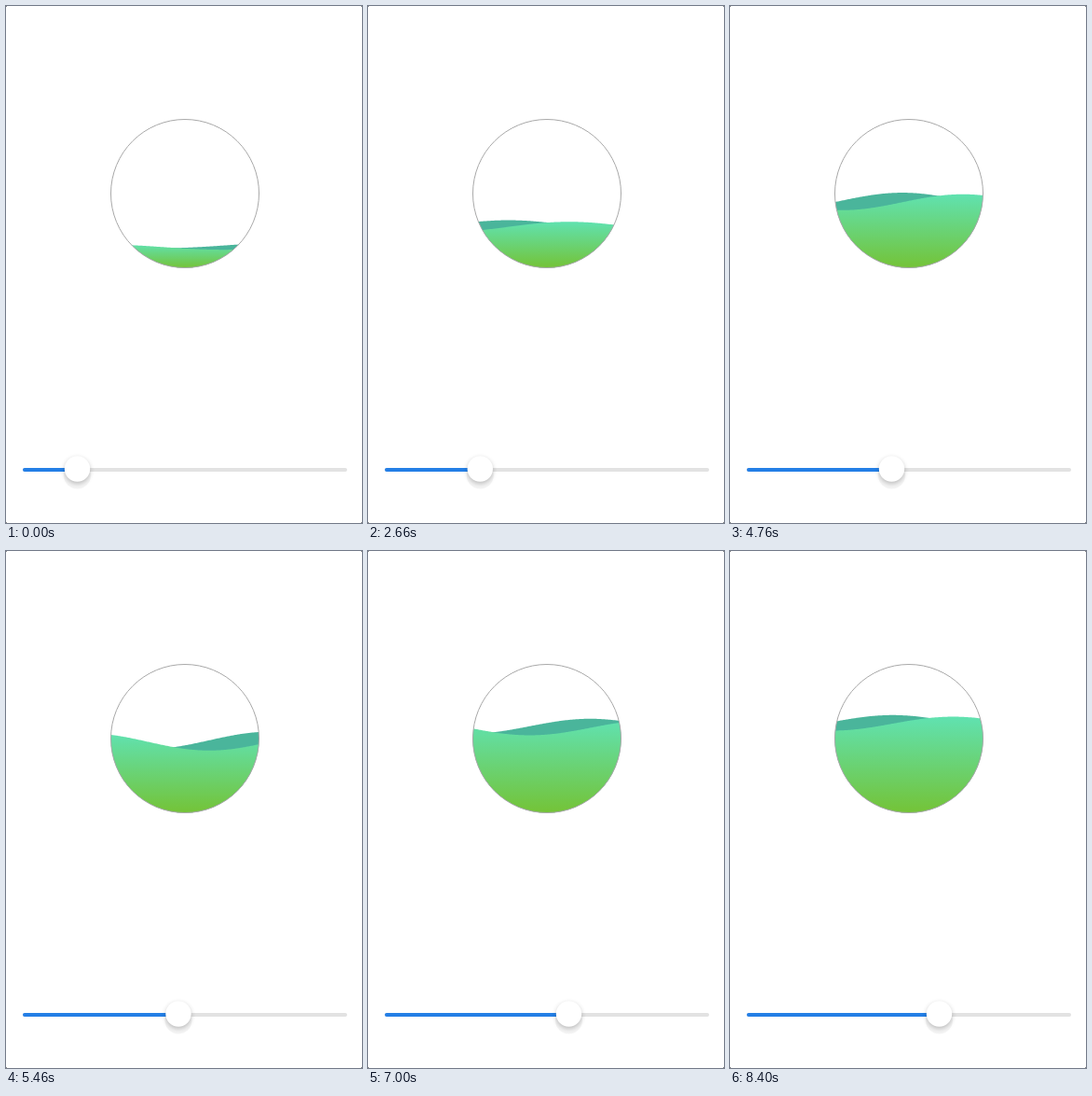
Write an HTML page with a canvas that moves like this. It is 382 by 554 pixels and loops after 8.47 s.

```html
<!DOCTYPE html>
<html lang="en">
<head>
<meta charset="utf-8">
<title>Liquid gauge</title>
<style>
html, body { margin: 0; width: 100%; height: 100%; overflow: hidden; background: #fff; }
canvas { display: block; width: 382px; height: 554px; }
</style>
</head>
<body>
<canvas id="stage" width="382" height="554"></canvas>
<script>
const ctx = document.getElementById('stage').getContext('2d');
const W = 382, H = 554, LOOP = 8470, STEP = 70, TAU = Math.PI * 2;
const BALL = { x: 192, y: 201, r: 80 };
const TRACK = { left: 18, right: 366, y: 497 };
const WAVE = { length: 260, start: 201, speed: 0.14, peak: 19 };

// Thumb position over time: [ms, x]
const drag = [
  [0, 76.5], [1680, 76.5], [1750, 78.5], [1820, 82], [2730, 123.5],
  [3640, 150.5], [4480, 172.5], [4760, 173.5], [5460, 185], [6090, 194.5],
  [6370, 201], [7000, 215.5], [7280, 224.5], [8470, 224.5]
];

function thumbAt(t) {
  const i = drag.findIndex(k => k[0] > t);
  const [t0, x0] = drag[i - 1], [t1, x1] = drag[i];
  return x0 + (x1 - x0) * (t - t0) / (t1 - t0);
}

function disc(x, y, r) {
  ctx.beginPath();
  ctx.arc(x, y, r, 0, TAU);
}

function wave(level, amp, trough, fill) {
  const bottom = BALL.y + BALL.r;
  ctx.beginPath();
  ctx.moveTo(BALL.x - BALL.r, bottom);
  for (let x = BALL.x - BALL.r; x <= BALL.x + BALL.r; x++) {
    ctx.lineTo(x, level + amp * Math.cos(TAU * (x - trough) / WAVE.length));
  }
  ctx.lineTo(BALL.x + BALL.r, bottom);
  ctx.fillStyle = fill;
  ctx.fill();
}

function drawBall(t, value) {
  const bottom = BALL.y + BALL.r;
  const level = bottom - 2 * BALL.r * value;
  const amp = WAVE.peak * Math.min(value, 1 - value);
  const mid = WAVE.start + WAVE.speed * t;
  const shift = WAVE.length / 8;
  const green = ctx.createLinearGradient(0, level - amp, 0, bottom);
  green.addColorStop(0, '#60e2b2');
  green.addColorStop(1, '#74c336');

  ctx.save();
  disc(BALL.x, BALL.y, BALL.r - 0.5);
  ctx.clip();
  wave(level - 0.6, amp, mid - shift, '#4ab59b');
  wave(level + 1.1, amp, mid + shift, green);
  ctx.restore();

  disc(BALL.x, BALL.y, BALL.r - 0.5);
  ctx.strokeStyle = '#a9a9a9';
  ctx.lineWidth = 1;
  ctx.stroke();
}

function bar(to, color) {
  ctx.beginPath();
  ctx.moveTo(TRACK.left + 2, TRACK.y);
  ctx.lineTo(to - 2, TRACK.y);
  ctx.strokeStyle = color;
  ctx.lineWidth = 4;
  ctx.lineCap = 'round';
  ctx.stroke();
}

function drawSlider(x) {
  bar(TRACK.right, '#e2e2e2');
  bar(x, '#247fe6');
  ctx.fillStyle = 'rgba(0,0,0,0.045)';
  disc(x, 503, 14.5);
  ctx.fill();
  ctx.save();
  ctx.shadowColor = 'rgba(0,0,0,0.24)';
  ctx.shadowBlur = 5;
  ctx.shadowOffsetY = 2;
  ctx.fillStyle = '#fff';
  disc(x, 496, 13.7);
  ctx.fill();
  ctx.restore();
}

function drawCorners() {
  ctx.fillStyle = '#8a8a8a';
  for (const x of [0, W - 1]) {
    for (const y of [0, H - 1]) ctx.fillRect(x, y, 1, 1);
  }
}

function draw(t) {
  const x = thumbAt(t);
  ctx.fillStyle = '#fff';
  ctx.fillRect(0, 0, W, H);
  drawBall(t, (x - 28.5) / 323);
  drawSlider(x);
  drawCorners();
}

const begin = performance.now();
function tick() {
  const t = (performance.now() - begin) % LOOP;
  draw(Math.floor(t / STEP) * STEP);
  requestAnimationFrame(tick);
}
tick();
</script>
</body>
</html>
```
